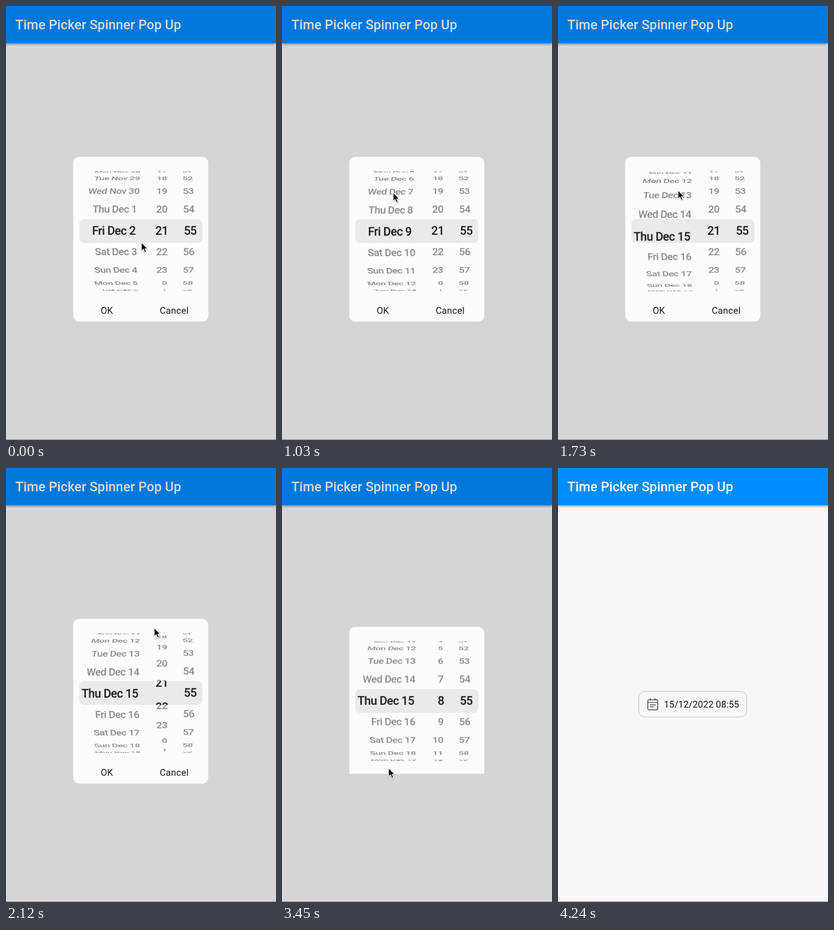
An HTML page for the animation above (4.67 s loop, 590x949 px).

```html
<!DOCTYPE html>
<html lang="en">
<head>
<meta charset="utf-8">
<title>Time picker spinner</title>
<style>
  html, body { margin: 0; width: 100%; height: 100%; overflow: hidden; background: #f9f7fb; }
  body { font-family: Roboto, Arial, sans-serif; color: #1a181c; }
  #stage { position: relative; width: 590px; height: 949px; overflow: hidden; background: #f9f7fb; }
  #stage div, #stage svg { position: absolute; }
  .full { left: 0; top: 0; width: 590px; height: 949px; }
  #bar {
    left: 0; top: 0; width: 590px; height: 80.5px; background: #008cff;
    box-shadow: 0 2px 5px rgba(0, 0, 0, .5);
  }
  #bar div {
    left: 20.5px; top: 21px; line-height: 40px; white-space: nowrap;
    font-size: 28.8px; font-weight: 500; letter-spacing: .1px; color: #fff;
  }
  #field {
    left: 176px; top: 488px; width: 235px; height: 55px;
    border: 1px solid #b6b4b8; border-radius: 14px;
  }
  #field svg { left: 17px; top: 13px; }
  #field div {
    left: 54.5px; top: 13px; line-height: 30px; white-space: nowrap;
    font-size: 20.2px; letter-spacing: .1px;
  }
  #scrim { background: #000; }
  #panel { left: 147px; top: 329.5px; width: 294.5px; background: #fdfbff; }
  #band { left: 160px; top: 466px; width: 268.5px; height: 51.5px; border-radius: 10px; background: #ebe9ed; }
  .button {
    top: 651px; width: 120px; line-height: 30px; text-align: center;
    font-size: 20.2px; letter-spacing: .3px;
  }
  .around {
    opacity: .5;
    clip-path: path(evenodd, "M0 358H590V626H0ZM0 466H590V517.5H0Z");
  }
  .lens { clip-path: path("M0 466H590V517.5H0Z"); }
  .wheel { perspective: 546px; }
  .item {
    top: 477px; width: 150px; height: 30px; line-height: 30px;
    text-align: right; white-space: pre;
    font-size: 23.04px; font-weight: 500; letter-spacing: -.59px;
  }
  #edge { left: 0; top: 948px; width: 590px; height: 1px; background: #737274; }
  #cursor { left: -4px; top: -4px; filter: drop-shadow(0 1px 1px rgba(0, 0, 0, .35)); }
</style>
</head>
<body>
<div id="stage">
  <div id="bar"><div>Time Picker Spinner Pop Up</div></div>
  <div id="field">
    <svg width="28" height="30" fill="none" stroke="#48464a" stroke-width="1.7" stroke-linecap="round">
      <rect x="2.3" y="4.8" width="21.6" height="22" rx="2.5"/>
      <path d="M7.8 1.8V5M18.4 1.8V5M2.5 10.5H23.7M7.5 15.8H18.8M7.5 20.3H14.5"/>
    </svg>
    <div>15/12/2022 08:55</div>
  </div>
  <div id="scrim" class="full"></div>
  <div id="dialog" class="full">
    <div id="panel"></div>
    <div id="band"></div>
    <div id="buttons" class="full">
      <div class="button" style="left:160.5px">OK</div>
      <div class="button" style="left:307.5px">Cancel</div>
    </div>
  </div>
  <div id="edge"></div>
  <svg id="cursor" width="30" height="36" viewBox="-4 -4 30 36">
    <path d="M0 0V18.5L4.3 14.8L7.3 21.8L10.4 20.5L7.5 13.6H13Z"
      fill="#000" stroke="#fff" stroke-width="1.3" stroke-linejoin="round"/>
  </svg>
</div>
<script>
const LOOP = 4670, MID = 492, RADIUS = 168, STEP = 16.3, ZOOM = 1.119;
const ITEM_DRAG = 46, SLOP = 18;
const $ = id => document.getElementById(id);
const clamp = v => Math.min(1, Math.max(0, v));
const smooth = v => v * v * (3 - 2 * v);

const DAYS = ['Sun', 'Mon', 'Tue', 'Wed', 'Thu', 'Fri', 'Sat'];
const MONTHS = { 10: 'Nov', 11: 'Dec' };
function dayLabel(i) {
  const d = new Date(Date.UTC(2022, 11, 2 + i));
  const day = String(d.getUTCDate()).padEnd(2);
  return `${DAYS[d.getUTCDay()]} ${MONTHS[d.getUTCMonth()]} ${day}`;
}

function add(parent, className) {
  const el = document.createElement('div');
  el.className = className;
  parent.append(el);
  return el;
}

// A cylinder of labels drawn twice: dimmed around the band, magnified inside it.
function makeWheel(right, vanish, label) {
  const origin = `${vanish}px ${MID}px`;
  const views = ['around', 'lens'].map(name => {
    const view = add(add($('dialog'), 'full ' + name), 'full wheel');
    view.style.perspectiveOrigin = view.style.transformOrigin = origin;
    if (name === 'lens') view.style.transform = `scale(${ZOOM})`;
    return Array.from({ length: 11 }, () => {
      const item = add(view, 'item');
      item.style.left = right - 150 + 'px';
      return item;
    });
  });
  return pos => views.forEach(items => items.forEach((item, n) => {
    const i = Math.round(pos) + n - 5;
    const angle = (i - pos) * STEP;
    const text = label(i);
    if (item.textContent !== text) item.textContent = text;
    item.style.visibility = Math.abs(angle) < 79.5 ? 'visible' : 'hidden';
    item.style.transform =
      `translateZ(${-RADIUS}px) rotateX(${-angle}deg) translateZ(${RADIUS}px)`;
  }));
}

const showDate = makeWheel(291, 308, dayLabel);
const showHour = makeWheel(352.7, 340, i => String((21 + i + 24) % 24));
const showMinute = makeWheel(411.8, 372, i => String((55 + i) % 60).padStart(2, '0'));
showMinute(0);

// time, x, y, 1 = constant speed
const PATH = [
  [0, 296, 517], [60, 296, 517], [450, 243, 640], [740, 243, 640],
  [960, 243, 408, 1], [1620, 243, 408], [1980, 328, 386], [2090, 325, 386],
  [2120, 324, 351, 1], [2180, 323, 260, 1], [2240, 322, 260],
  [2730, 267, 602], [2950, 233, 656], [LOOP, 233, 656]
];
function cursorAt(t) {
  const k = Math.max(1, PATH.findIndex(p => p[0] >= t));
  const [t0, x0, y0] = PATH[k - 1], [t1, x1, y1, even] = PATH[k];
  const u = clamp((t - t0) / (t1 - t0));
  const e = even ? u : smooth(u);
  return [x0 + (x1 - x0) * e, y0 + (y1 - y0) * e];
}

// The wheel follows the pointer, then coasts to its last item.
function spin(t, { press, release, last, tau }) {
  if (t <= press) return 0;
  const pulled = cursorAt(press)[1] - cursorAt(Math.min(t, release))[1];
  const held = Math.max(0, (pulled - SLOP) / ITEM_DRAG);
  if (t <= release) return held;
  const left = (last - held) * Math.exp(-(t - release) / tau);
  return left < .04 ? last : last - left;
}
const DATE_FLING = { press: 740, release: 960, last: 13, tau: 220 };
const HOUR_FLING = { press: 2090, release: 2180, last: 11, tau: 211 };

function draw(t) {
  showDate(spin(t, DATE_FLING));
  showHour(spin(t, HOUR_FLING));

  const closing = t >= 3420;
  $('dialog').style.transform = `translateY(${closing ? 17.5 : 0}px)`;
  $('panel').style.height = (closing ? 321 : 360.5) + 'px';
  $('panel').style.borderRadius = closing ? '13px 13px 0 0' : '13px';
  $('buttons').style.display = closing ? 'none' : 'block';

  const shown = 1 - smooth(clamp((t - 3500) / 200));
  $('dialog').style.opacity = shown;
  $('scrim').style.opacity = .14 * shown;

  const [x, y] = cursorAt(t);
  $('cursor').style.transform = `translate(${x}px, ${y}px)`;
  $('cursor').style.display = t < 3750 ? 'block' : 'none';
}

const start = performance.now();
function tick() {
  draw((performance.now() - start) % LOOP);
  requestAnimationFrame(tick);
}
draw(0);
requestAnimationFrame(tick);
</script>
</body>
</html>
```
